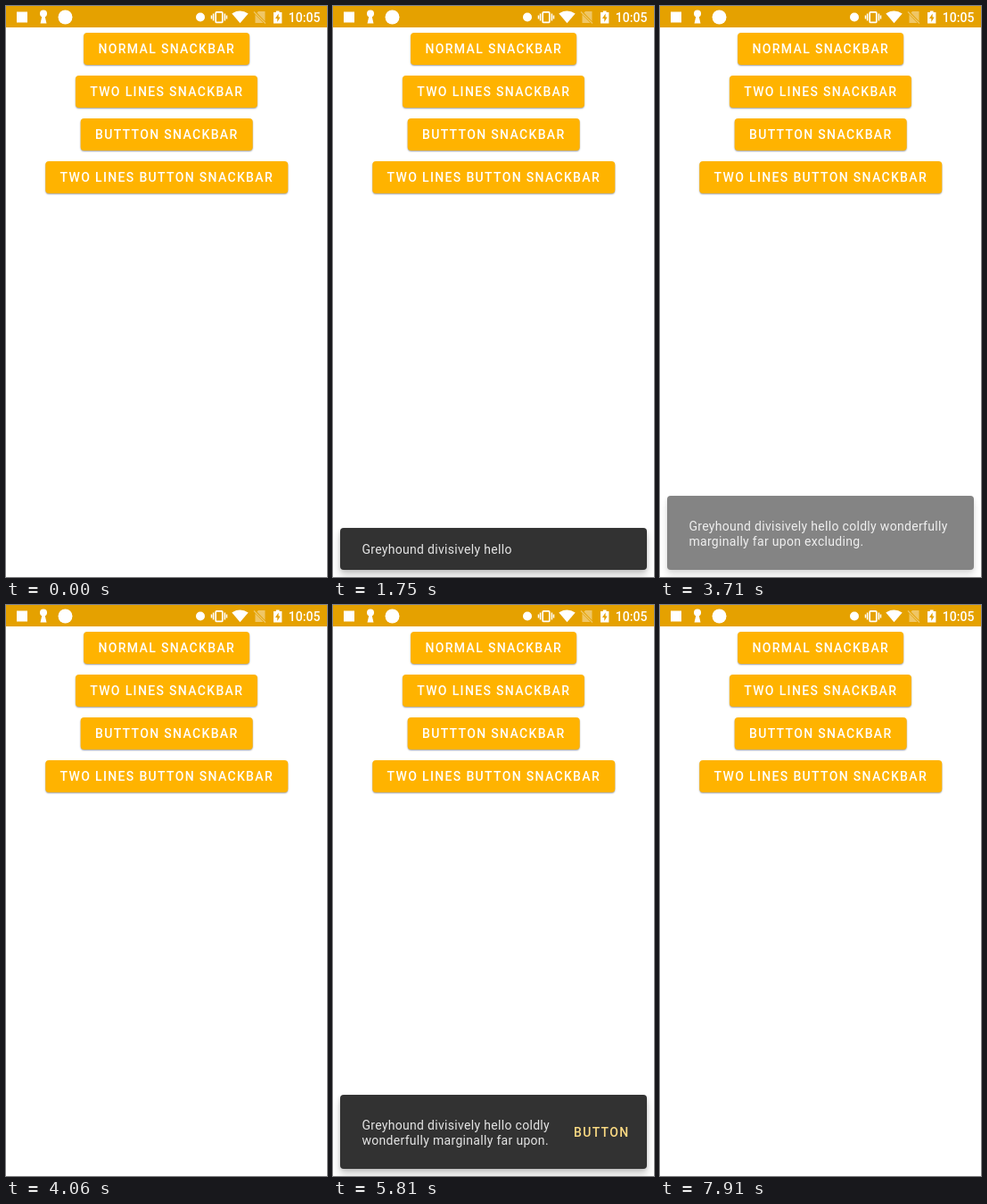
Recreate the animation shown at these times as an HTML page. Size 360x640 px, loop 7980 ms.

```html
<!DOCTYPE html>
<html lang="en">
<head>
<meta charset="utf-8">
<title>Snackbar demo</title>
<style>
  html, body { margin: 0; width: 100%; height: 100%; overflow: hidden; background: #fff; }
  body { position: relative; font: 14px Roboto, "Noto Sans", sans-serif; }
  .stage { position: absolute; left: 0; top: 0; width: 360px; height: 640px; overflow: hidden; background: #fff; }

  .status { position: absolute; left: 0; top: 0; width: 360px; height: 24px; background: #e5a100; }
  .status svg { position: absolute; left: 0; top: 0; }
  .clock { position: absolute; right: 7.6px; top: 1px; font-weight: 500; line-height: 24px; color: #fff; }

  .btn, .action { font-weight: 500; letter-spacing: 1.34px; white-space: nowrap; }
  .btn {
    position: absolute; left: 180.3px; top: var(--y); height: 36px; padding: 0 16px;
    transform: translateX(-50%); overflow: hidden; border-radius: 4px;
    line-height: 37px; color: #fff; background: #ffb300;
    box-shadow: 0 1px 2px rgba(0,0,0,.28), 0 1px 1px rgba(0,0,0,.12);
  }
  .btn::before, .btn::after { content: ""; position: absolute; background: #fff; opacity: 0; }
  .btn::before { inset: 0; animation: tint 7980ms linear calc(var(--at) - 130ms) infinite both; }
  .btn::after {
    left: calc(var(--x) - 200px); top: -174px; width: 400px; height: 400px; border-radius: 50%;
    animation: ripple 7980ms linear calc(var(--at) - 130ms) infinite both;
  }

  .snack {
    position: absolute; left: 8px; bottom: 8px; width: 344px; height: 47px;
    box-sizing: border-box; padding: 2px 0 0 24.4px; display: flex; align-items: center;
    border-radius: 4px; background: #323232; color: #e4e4e4;
    line-height: 16.5px; letter-spacing: .31px; white-space: nowrap;
    box-shadow: 0 6px 9px rgba(0,0,0,.2), 0 1px 4px rgba(0,0,0,.12);
    animation: snack-fade 7980ms linear var(--at) infinite both,
               snack-grow 7980ms linear var(--at) infinite both;
  }
  .tall { height: 83px; }
  .action { position: absolute; left: 262px; color: #fbda83; }

  /* Press 130 ms, then release and fade for 530 ms */
  @keyframes tint {
    0% { opacity: 0; }
    1.629% { opacity: .4; }
    8.271%, 100% { opacity: 0; }
  }
  @keyframes ripple {
    0% { opacity: .27; transform: scale(0); }
    1.629% { opacity: .27; transform: scale(.32); }
    8.271%, 100% { opacity: 0; transform: scale(.91); }
  }
  /* In over 150 ms, out from 1530 to 1605 ms */
  @keyframes snack-fade {
    0% { opacity: 0; }
    1.88%, 19.173% { opacity: 1; }
    20.113%, 100% { opacity: 0; }
  }
  @keyframes snack-grow {
    0% { transform: scale(.8); animation-timing-function: cubic-bezier(0, 0, .2, 1); }
    1.88%, 100% { transform: scale(1); }
  }
</style>
</head>
<body>
<div class="stage">
  <div class="status">
    <svg width="360" height="24" fill="#fff">
      <rect x="12" y="6.5" width="12" height="12"/>
      <circle cx="42" cy="8.5" r="4"/>
      <path d="M40.5 11h3l2 8.5h-7z"/>
      <circle cx="66.5" cy="12.5" r="8"/>
      <circle cx="218" cy="12.5" r="5"/>
      <rect x="235.2" y="6.8" width="7.6" height="11.6" rx="1" fill="none" stroke="#fff" stroke-width="1.7"/>
      <path d="M232.6 8.5v8M245.4 8.5v8M230.5 10.5v4M247.5 10.5v4" stroke="#fff" stroke-width="1.5"/>
      <path d="M262.5 19.2 253.3 8.4Q262.5 2.6 271.7 8.4Z"/>
      <g opacity=".4">
        <path d="M283 6h7.5v13h-11V9.5z"/>
        <path d="M278 6 291 19.5" stroke="#e5a100" stroke-width="2.6"/>
        <path d="M278 6.5 291 19.5" stroke="#fff" stroke-width="1.3"/>
      </g>
      <path d="M300 7h2.8V5.6h3.8V7h2.8v12.4H300z"/>
      <path d="M305.6 8.5 302 14h2.3v4l3.3-5.4h-2z" fill="#e5a100"/>
    </svg>
    <div class="clock">10:05</div>
  </div>

  <div class="btn" style="--y:30px; --x:18px; --at:300ms">NORMAL SNACKBAR</div>
  <div class="btn" style="--y:78px; --x:19px; --at:2150ms">TWO LINES SNACKBAR</div>
  <div class="btn" style="--y:126px; --x:14px; --at:4290ms">BUTTTON SNACKBAR</div>
  <div class="btn" style="--y:174px; --x:33px; --at:6260ms">TWO LINES BUTTON SNACKBAR</div>

  <div class="snack" style="--at:300ms">Greyhound divisively hello</div>
  <div class="snack tall" style="--at:2150ms">Greyhound divisively hello coldly wonderfully<br>marginally far upon excluding.</div>
  <div class="snack tall" style="--at:4290ms">Greyhound divisively hello coldly<br>wonderfully marginally far upon.<span class="action">BUTTON</span></div>
  <div class="snack tall" style="--at:6260ms">Greyhound divisively hello coldly<br>wonderfully marginally far upon.<span class="action">BUTTON</span></div>
</div>
<script>
  // Advance the CSS animations in 70 ms steps.
  const LOOP = 7980, STEP = 70;
  const anims = document.getAnimations();
  anims.forEach(a => a.pause());
  const start = performance.now();

  function tick() {
    const t = (performance.now() - start) % LOOP;
    const time = Math.floor(t / STEP) * STEP;
    anims.forEach(a => { a.currentTime = time; });
    requestAnimationFrame(tick);
  }
  tick();
</script>
</body>
</html>
```
